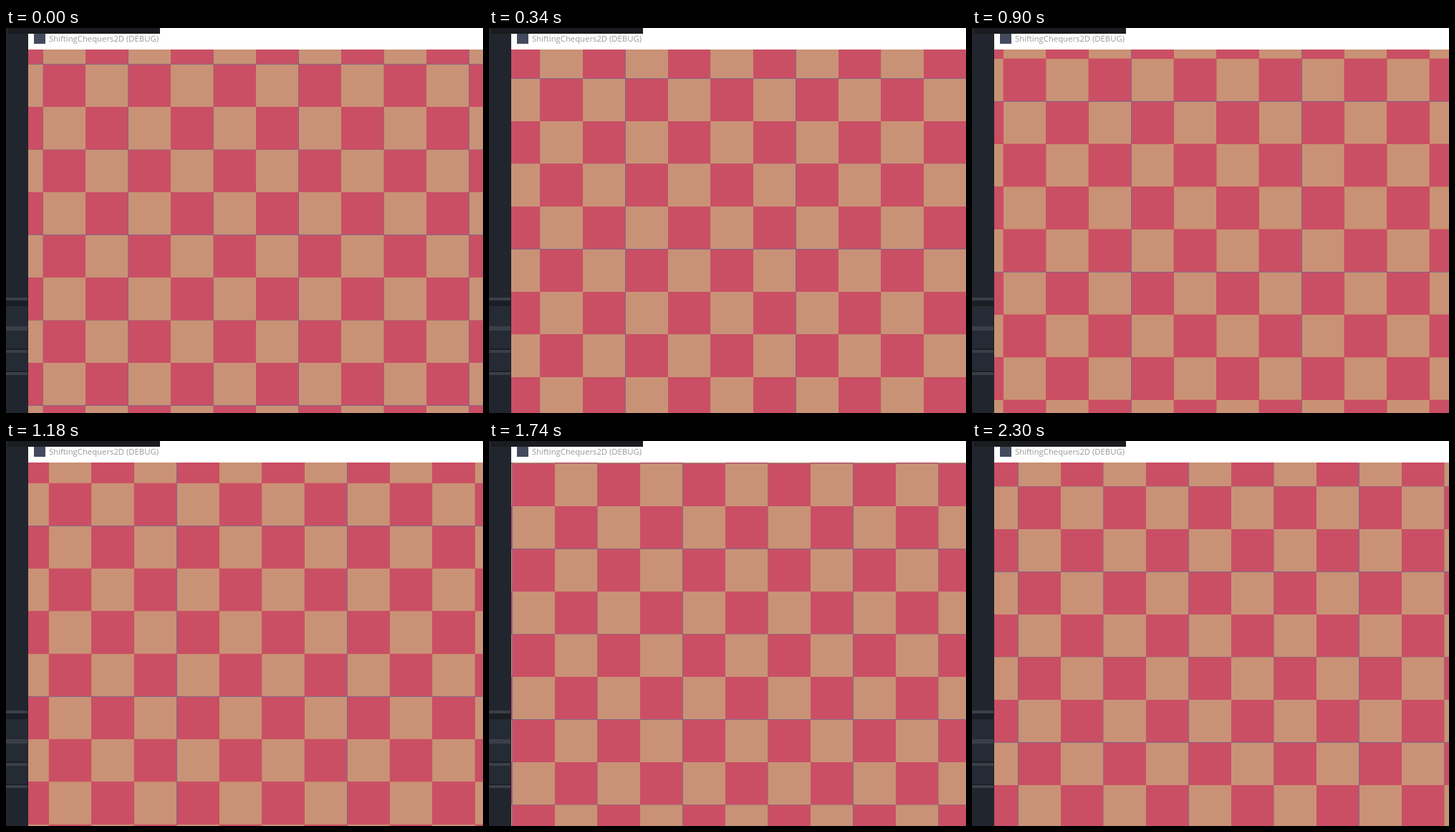
Animation, 666 px wide and 537 px high, one loop 2370 ms. Source, as an HTML page with a canvas:

```html
<!DOCTYPE html>
<html lang="en">
<head>
<meta charset="utf-8">
<title>Scrolling checkerboard</title>
<style>
html, body { margin: 0; width: 100%; height: 100%; overflow: hidden; background: #21252d; }
canvas { position: absolute; left: 0; top: 0; }
#title {
  position: absolute; left: 60px; top: 0;
  font: 11.3px/30px "Open Sans", "Noto Sans", sans-serif;
  color: #999; white-space: pre;
}
</style>
</head>
<body>
<canvas id="stage" width="666" height="537"></canvas>
<div id="title">ShiftingChequers2D (DEBUG)</div>
<script>
const W = 666, H = 537, LEFT = 31, TOP = 30;
const TILE = 59.5, LOOP = 2370, STEP = 70, SPEED = 3.988;
const RED = '#ca4f65', TAN = '#c99276';
const ctx = document.getElementById('stage').getContext('2d');

function rect(color, x, y, w, h) {
  ctx.fillStyle = color;
  ctx.fillRect(x, y, w, h);
}

function drawFrame() {
  rect('#21252d', 0, 0, 31, H);
  rect('#1b1e24', 0, 380, 30, 8);
  rect('#252b34', 0, 388, 30, 92);
  rect('#1b1e24', 0, 447, 30, 2);
  rect('#1b1e24', 0, 478, 30, 2);
  for (const [y, h] of [[376, 4], [416, 6], [449, 4], [480, 4]]) rect('#3a3f49', 0, y, 30, h);
  rect('#fff', LEFT, 0, W - LEFT, TOP);
  rect('#1a1b1e', 3, 0, 212, 8);
  rect('#444a5e', 39, 8, 16, 14);
}

// Seams between tiles: every second one is soft, every fourth is strong.
function drawSeams(origin, strongAt, step, vertical) {
  const soft = 0.4 + 0.4 * Math.cos((step - 28) / 34 * 2 * Math.PI);
  const warm = 0.45 * Math.max(0, 1 - Math.abs(step - 13) / 8);
  for (let i = -4; i < 12; i++) {
    const strong = (i + 4 - strongAt) % 4 === 0;
    let color = `rgba(212,80,70,${warm})`;
    if (strong) color = 'rgba(125,104,138,0.9)';
    else if (i % 2 === 0 && soft > warm) color = `rgba(145,112,122,${soft})`;
    const p = Math.floor(origin + i * TILE);
    if (vertical) rect(color, p, TOP, 1, H - TOP);
    else rect(color, LEFT, p, W - LEFT, 1);
  }
}

function drawBoard(step) {
  const x0 = 51.5 + SPEED * step, y0 = 50.5 + SPEED * step;
  const edge = (origin, i) => Math.round(origin + i * TILE);
  ctx.save();
  ctx.beginPath();
  ctx.rect(LEFT, TOP, W - LEFT, H - TOP);
  ctx.clip();
  for (let j = -4; j < 12; j++) {
    for (let i = -4; i < 12; i++) {
      const x = edge(x0, i), y = edge(y0, j);
      rect((i + j) % 2 ? TAN : RED, x, y, edge(x0, i + 1) - x, edge(y0, j + 1) - y);
    }
  }
  drawSeams(x0, 2, step, true);
  drawSeams(y0, 0, step, false);
  ctx.restore();
}

function tick() {
  const t = performance.now() % LOOP;
  const step = Math.floor((t < 210 ? t : t + 10) / STEP);
  drawFrame();
  drawBoard(step);
  requestAnimationFrame(tick);
}
tick();
</script>
</body>
</html>
```
